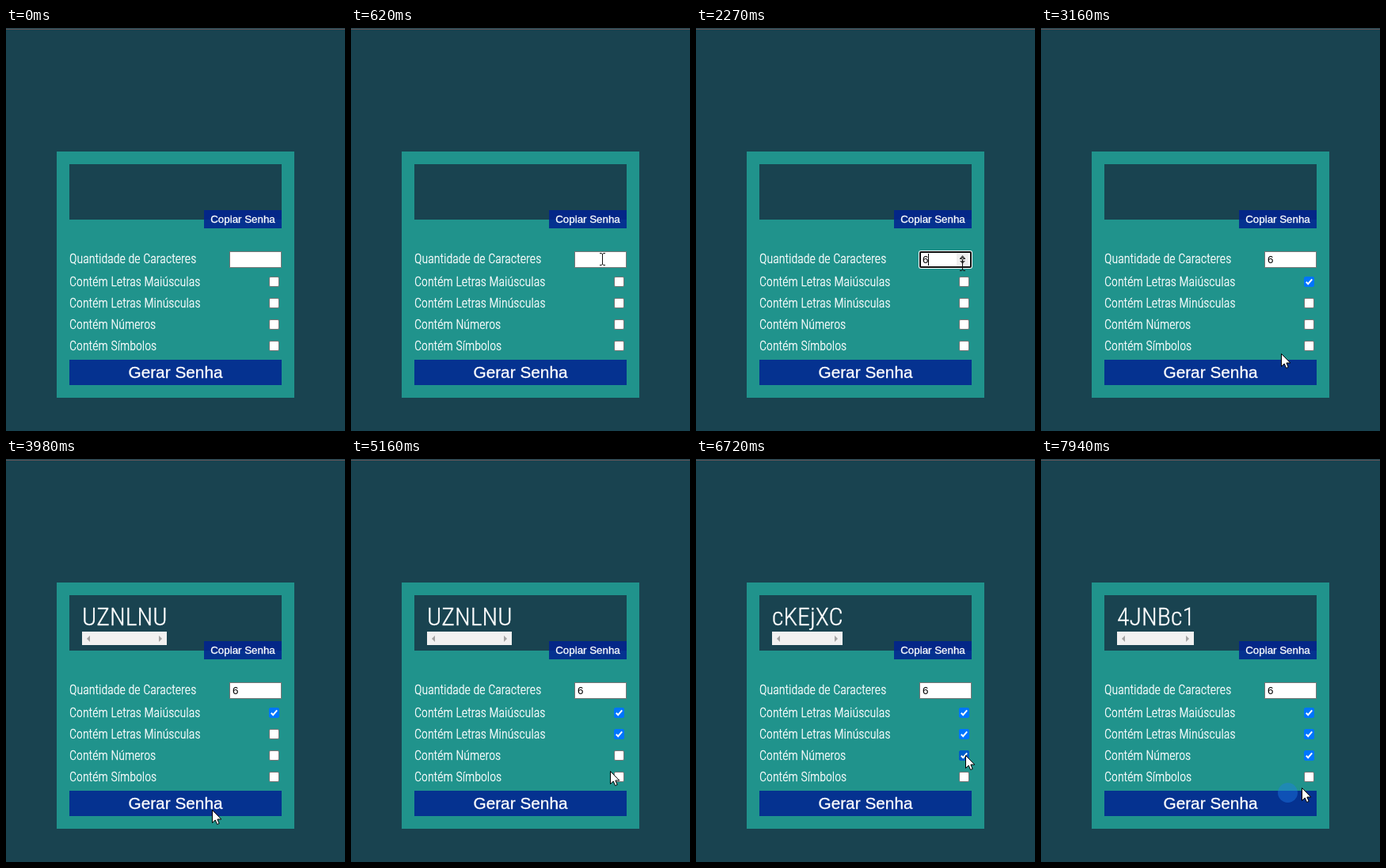
Animation, 428 px wide and 509 px high, one loop 8 s. Source, as an HTML page:

```html
<!DOCTYPE html>
<html lang="pt-BR">
<head>
<meta charset="utf-8">
<title>Gerador de senhas</title>
<style>
  html, body { margin: 0; width: 100%; height: 100%; overflow: hidden; background: #194350; }
  #stage { position: absolute; left: 0; top: 0; width: 428px; height: 509px; overflow: hidden; background: #194350; }
  #stage div, #stage svg { position: absolute; box-sizing: border-box; }
  .topline { left: 0; top: 1px; width: 428px; height: 1px; background: #65575a; }
  .panel { left: 64px; top: 156px; width: 300px; height: 311px; background: #20938c; }
  .output { left: 80px; top: 172px; width: 268px; height: 70px; background: #194350; }
  .narrow {
    font-family: "Roboto Condensed", Roboto, sans-serif; font-weight: 300; font-stretch: 75%;
    color: #fff; white-space: pre; transform-origin: 0 0; -webkit-text-stroke: .3px #fff;
  }
  .wide .narrow { transform: scaleX(.873); }
  .label { left: 80px; font-size: 16px; line-height: 19px; }
  #pass { left: 96px; top: 180px; font-size: 32px; line-height: 38px; }
  #bar { left: 96px; top: 218px; height: 17px; background: #f1f1f1; }
  #bar::before, #bar::after { content: ""; position: absolute; top: 4.5px; border: 4px solid transparent; }
  #bar::before { left: 2px; border-right-color: #a3a3a3; }
  #bar::after { right: 2px; border-left-color: #a3a3a3; }
  .button {
    color: #fff; background: rgba(1, 33, 145, .85); text-align: center; white-space: pre;
    font-family: "Liberation Sans", Arial, sans-serif; -webkit-text-stroke: .3px #fff;
  }
  .copy { left: 250px; top: 230px; width: 98px; height: 23px; font-size: 13.333px; line-height: 23px; }
  .make { left: 80px; top: 419px; width: 268px; height: 32px; font-size: 20.8px; line-height: 32px; }
  #field { left: 282px; top: 282px; width: 66px; height: 21px; background: #fff; border: 1px solid #767676; }
  #field.focus { border: 2px solid #101010; border-radius: 2px; box-shadow: 0 0 0 1px #fff; }
  #num { left: 286px; top: 285px; font: 13.333px/15px "Liberation Sans", Arial, sans-serif; color: #000; }
  #caret { top: 285px; width: 1px; height: 15px; background: #000; }
  #spin { left: 329px; top: 284px; }
  .box { left: 332px; width: 13px; height: 13px; border: 1px solid #767676; border-radius: 2px; background: #fff; }
  .box svg { display: none; left: -1px; top: -1px; }
  .box.on { background: #0075ff; border-color: #0075ff; }
  .box.on.hover { background: #005cc8; border-color: #005cc8; }
  .box.on svg { display: block; }
  #pulse { width: 25px; height: 25px; margin: -12.5px; border-radius: 50%; background: rgba(32, 125, 235, .42); }
  #arrow, #beam { left: 0; top: 0; overflow: visible; }
  #arrow { margin-top: -1px; }
</style>
</head>
<body>
<div id="stage">
  <div class="topline"></div>
  <div class="panel"></div>
  <div class="output"></div>
  <div id="pass" class="narrow"></div>
  <div id="bar"></div>
  <div class="button copy">Copiar Senha</div>
  <div class="narrow label" style="top:282px">Quantidade de Caracteres</div>
  <div id="field"></div>
  <svg id="spin" width="15" height="17">
    <rect width="15" height="17" fill="#efefef"/>
    <rect id="spinUp" width="15" height="8" fill="#c9c9c9"/>
    <path d="M4 7 7.5 3 11 7zM4 10 7.5 14 11 10z" fill="#505050"/>
  </svg>
  <div id="num"></div>
  <div id="caret"></div>
  <div class="button make">Gerar Senha</div>
  <div id="pulse"></div>
  <svg id="arrow" width="13" height="20">
    <path d="M.5 .5V16.5L4.2 13 6.6 18.5 9.2 17.4 6.9 12H11.8z" fill="#fff" stroke="#000"/>
  </svg>
  <svg id="beam" width="8" height="17">
    <path d="M-3-7.5H-1L.5-6.5 2-7.5H4M.5-6.5V6.5M-3 7.5H-1L.5 6.5 2 7.5H4" fill="none" stroke="#111"/>
  </svg>
</div>
<script>
const LOOP = 8000, STEP = 70, FIRST = 130;
const MS_PER_PX = 4, REST = 70;             // pointer speed, pause around a press
const SPIN_START = 1250, SPIN_GAP = 150, SPIN_MAX = 6;
const passwords = ['UZNLNU', 'cKEjXC', '4JNBc1'];
const $ = id => document.getElementById(id);
const stage = $('stage');

// Where the pointer arrives, when, and what it presses there
const stops = [
  { at: FIRST, x: 381, y: 500 },
  { at: 620, x: 317, y: 292, act: 'field' },
  { at: 1110, x: 334, y: 291 },
  { at: 2200, x: 336, y: 299 },
  { at: 2690, x: 337, y: 318, act: 'box' },
  { at: 3430, x: 280, y: 475 },
  { at: 3760, x: 260, y: 444, act: 'make' },
  { at: 4480, x: 340, y: 344, act: 'box' },
  { at: 4790, x: 359, y: 380 },
  { at: 5110, x: 327, y: 395 },
  { at: 5330, x: 322, y: 425, act: 'make' },
  { at: 6450, x: 340, y: 375, act: 'box' },
  { at: 7000, x: 311, y: 421 },
  { at: 7210, x: 311, y: 421, act: 'make' },
  { at: 7870, x: 329, y: 416 }
];
const presses = stops.filter(s => s.act).map(s => ({ ...s, at: s.at + REST }));

const boxes = ['Letras Maiúsculas', 'Letras Minúsculas', 'Números', 'Símbolos'].map((name, i) => {
  const y = 314 + 27 * i;
  const label = document.createElement('div');
  label.className = 'narrow label';
  label.style.top = y - 3 + 'px';
  label.textContent = 'Contém ' + name;
  const el = document.createElement('div');
  el.style.top = y + 'px';
  el.innerHTML = '<svg width="13" height="13"><path d="M2.8 6.8 5.2 9.2 10.2 3.4" fill="none" stroke="#fff" stroke-width="2"/></svg>';
  $('pulse').before(label, el);
  return { el, y };
});

// Narrow the face evenly when no condensed one is available
function checkNarrow() {
  const probe = document.createElement('span');
  probe.style.cssText = 'position:absolute;white-space:pre;font:300 100px Roboto,sans-serif';
  probe.textContent = 'Contém Letras';
  stage.append(probe);
  const normal = probe.getBoundingClientRect().width;
  probe.style.fontFamily = '"Roboto Condensed",Roboto,sans-serif';
  probe.style.fontStretch = '75%';
  const slim = probe.getBoundingClientRect().width;
  probe.remove();
  stage.classList.toggle('wide', slim > normal * .95);
}

const ease = k => k * k * (3 - 2 * k);
const show = (el, on) => { el.style.display = on ? 'block' : 'none'; };
const move = (el, p) => { el.style.left = p.x + 'px'; el.style.top = p.y + 'px'; };
const inside = (p, x, y, w, h) => !!p && p.x >= x && p.x < x + w && p.y >= y && p.y < y + h;

function pointerAt(t) {
  const i = stops.findIndex(s => s.at > t);
  if (i === 0) return null;
  if (i < 0) return stops[stops.length - 1];
  const a = stops[i - 1], b = stops[i];
  const span = Math.min(b.at - a.at - REST, MS_PER_PX * Math.hypot(b.x - a.x, b.y - a.y));
  const k = span ? ease(Math.max(0, 1 - (b.at - t) / span)) : 0;
  return { x: Math.round(a.x + (b.x - a.x) * k), y: Math.round(a.y + (b.y - a.y) * k) };
}

function setPassword(text) {
  const pass = $('pass');
  if (pass.textContent === text) return;
  pass.textContent = text;
  $('bar').style.width = Math.floor(pass.getBoundingClientRect().width) + 'px';
}

function render(time) {
  const t = time < FIRST ? 0 : FIRST + Math.floor((time - FIRST) / STEP) * STEP;
  const p = pointerAt(t);
  const past = presses.filter(s => s.at <= t);
  const last = past[past.length - 1];
  const done = act => past.filter(s => s.act === act).length;

  const made = done('make');
  setPassword(made ? passwords[made - 1] : '');
  show($('bar'), made > 0);

  const focus = !!last && last.act === 'field';
  const onSpin = inside(p, 329, 284, 15, 15);
  const onText = inside(p, 282, 282, 66, 21) && !onSpin;
  const value = Math.max(0, Math.min(SPIN_MAX, Math.floor((t - SPIN_START) / SPIN_GAP) + 1));
  const changed = value ? SPIN_START + (value - 1) * SPIN_GAP : presses[0].at;
  $('field').className = focus ? 'focus' : '';
  show($('spin'), focus);
  show($('spinUp'), onSpin);
  $('num').textContent = value || '';
  show($('caret'), focus && (t - changed) % 1000 < 500);
  $('caret').style.left = (value ? 293 : 286) + 'px';

  boxes.forEach((b, i) => {
    b.el.className = 'box' + (done('box') > i ? ' on' : '') + (inside(p, 332, b.y, 13, 13) ? ' hover' : '');
  });

  // A press flashes briefly; the final one stays marked
  const pulse = !!last && (t < last.at + 2 * STEP || past.length === presses.length);
  show($('pulse'), pulse);
  if (pulse) move($('pulse'), last);

  show($('arrow'), !!p && !onText);
  show($('beam'), onText);
  if (p) { move($('arrow'), p); move($('beam'), p); }
}

checkNarrow();
render(0);
const start = performance.now();
function tick() {
  render((performance.now() - start) % LOOP);
  requestAnimationFrame(tick);
}
requestAnimationFrame(tick);
</script>
</body>
</html>
```
